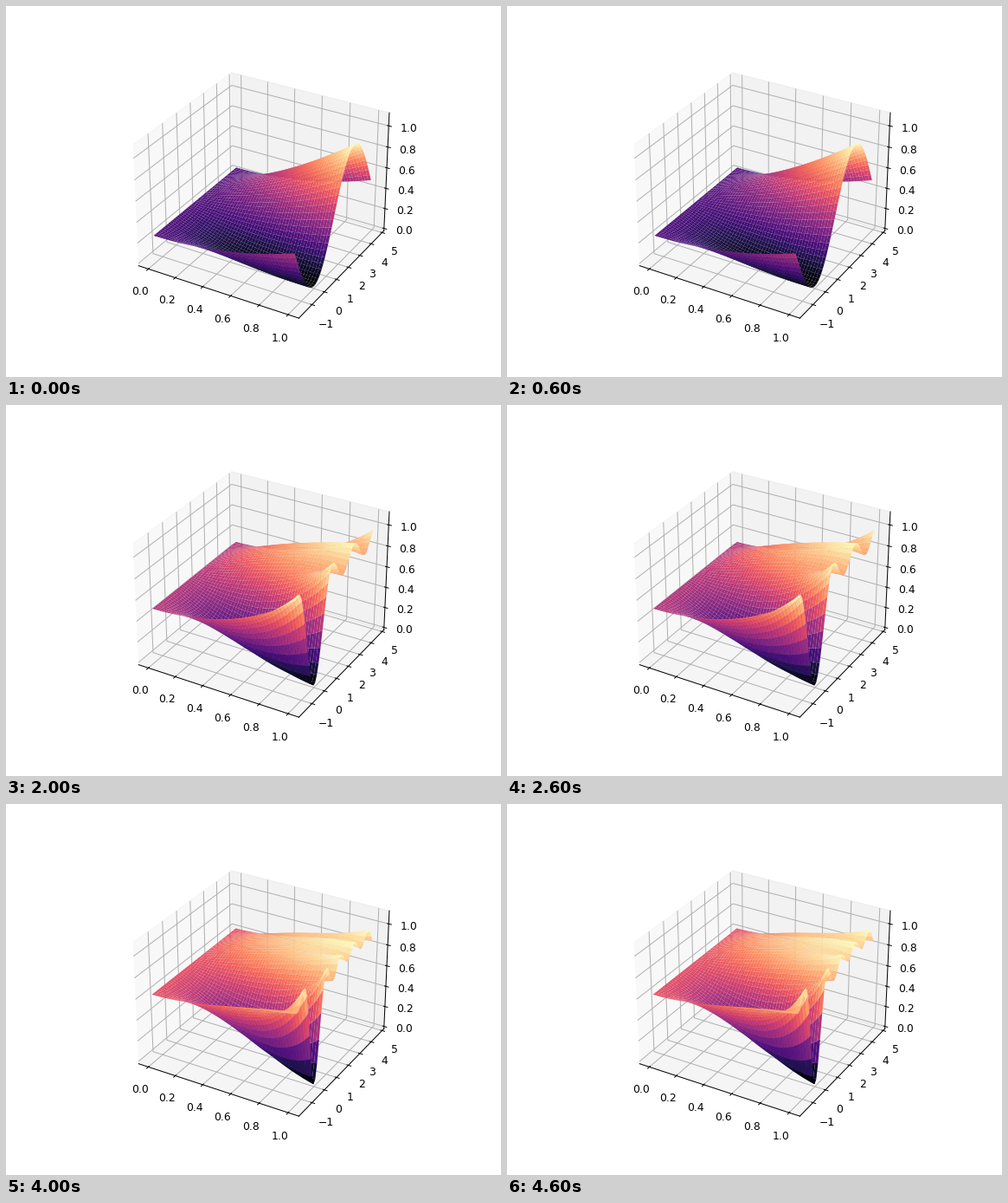
Recreate the animation shown at these times as a matplotlib script. Size 572 by 428 pixels, loop 5 s.

```python
import numpy as np
import matplotlib.pyplot as plt
from matplotlib.animation import FuncAnimation
from numpy.polynomial.legendre import Legendre

W, H, DPI = 572, 428, 89.375
FRAMES, LOOP_MS = 5, 5000

fig = plt.figure(figsize=((W + 1e-3) / DPI, (H + 1e-3) / DPI), dpi=DPI,
                 facecolor="white")
ax = fig.add_subplot(projection="3d")
plt.rcParams["font.family"] = "DejaVu Sans"

X, Y = np.meshgrid(np.linspace(0, 1, 50),
                   np.linspace(-np.pi / 2, 3 * np.pi / 2, 50))


def saturate(s, n):
    return n * s / (1 + (n - 1) * s)


def height(n):
    """Saturating bowl in polar coordinates with Legendre ripples at the rim."""
    bowl = saturate((1 - 2 * X * np.cos(Y) + X**2) / 4, n)
    rim = 1 - Legendre.basis(n)(np.cos(Y / 2)) ** 2
    ripple = X ** (n + 1) * (rim - saturate(np.sin(Y / 2) ** 2, n))
    valley = 0.0425 * (n - 1) * X**2 * (1 - X) * (1 + np.cos(Y))
    return np.clip(bowl + ripple + valley, 0, 1)


def padded(lo, hi, margin):
    """Widen a range by a data margin, then by the pane margin."""
    for m in (margin, 1 / 48):
        d = (hi - lo) * m
        lo, hi = lo - d, hi + d
    return lo, hi


ax.set_xlim(*padded(0, 1, 0.05))
ax.set_ylim(*padded(-np.pi / 2, 3 * np.pi / 2, 0.05))
ax.set_zlim(*padded(0, 1.1, 0))
ax.set_xticks(np.linspace(0, 1, 6))
ax.set_yticks(range(-1, 6))
ax.set_zticks(np.linspace(0, 1, 6))

surface = None


def update(i):
    global surface
    if surface is not None:
        surface.remove()
    surface = ax.plot_surface(X, Y, height(i + 1), cmap="magma")
    return (surface,)


def init():
    return update(0)


anim = FuncAnimation(fig, update, frames=FRAMES, init_func=init,
                     interval=LOOP_MS // FRAMES, repeat=True, repeat_delay=0)
plt.show()
```
